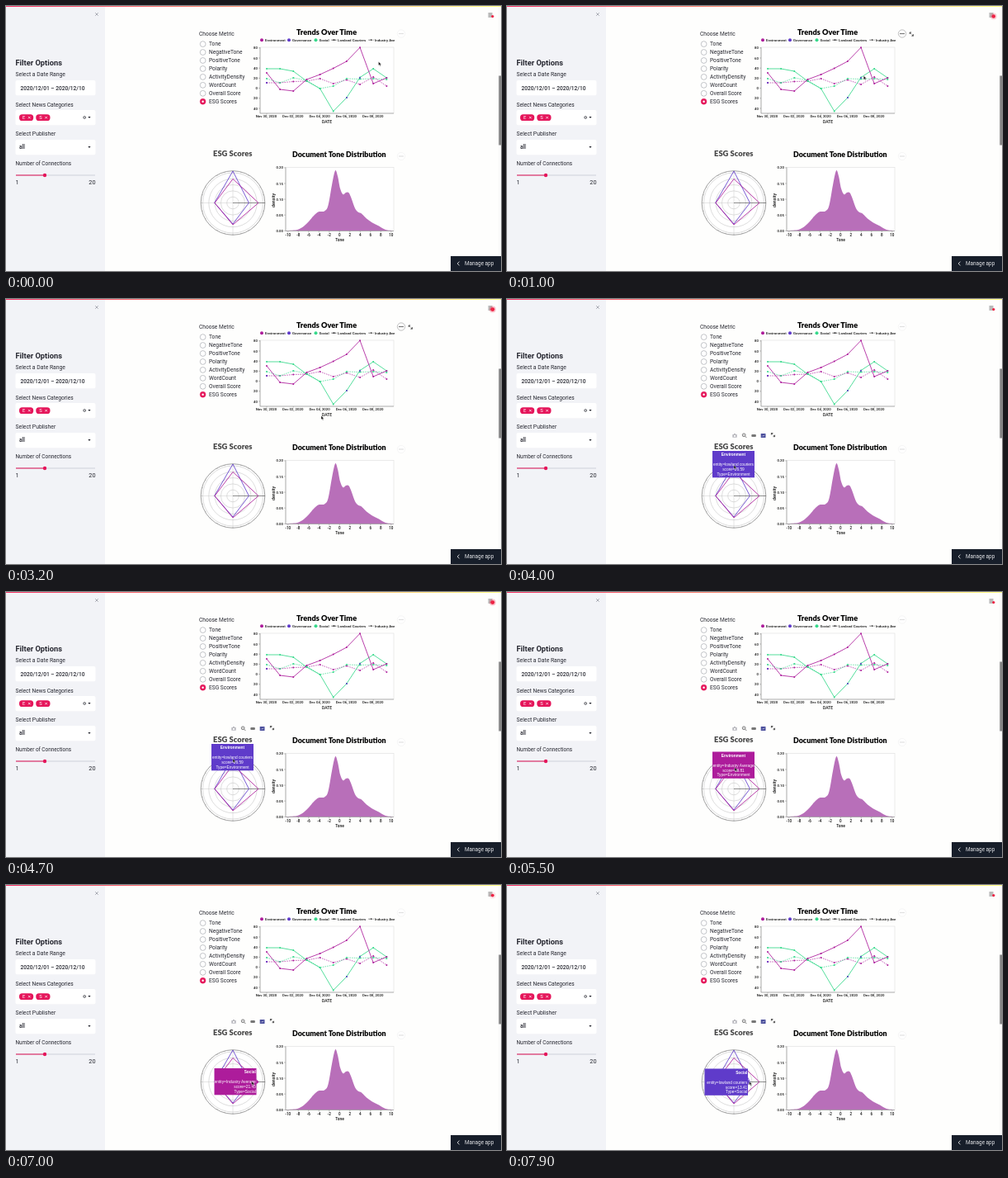
Write an HTML page that moves like this. It is 600 by 321 pixels and loops after 8000 ms.

```html
<!DOCTYPE html>
<html lang="en">
<head>
<meta charset="utf-8">
<title>News dashboard</title>
<style>
html, body { margin: 0; width: 100%; height: 100%; overflow: hidden; background: #fefefd; }
svg { display: block; width: 100%; height: 100%; }
text { font-family: Roboto, sans-serif; white-space: pre; }
.title { font-family: Lato, sans-serif; font-weight: 900; }
.chart text { fill: #111; font-weight: 500; }
.chart text.title { fill: #000; font-weight: 900; }
.chart text.soft { fill: #454545; }
.tip text { font-family: "Liberation Sans", Arial, sans-serif; }
</style>
</head>
<body>
<svg id="stage" viewBox="0 0 600 321" xmlns="http://www.w3.org/2000/svg"></svg>
<script>
const stage = document.getElementById('stage');
const INK = '#262730', PINK = '#e5165b', MAGENTA = '#ad1c9b', VIOLET = '#5f3bca', GREEN = '#36d98b';
const LOOP = 8000;

// Text placed by its vertical middle
const text = (x, y, size, str, extra = '') =>
  `<text x="${x}" y="${y + size * 0.36}" font-size="${size}" fill="${INK}" ${extra}>${str}</text>`;
const mid = 'text-anchor="middle"', end = 'text-anchor="end"', bold = 'font-weight="700"';
const rect = (x, y, w, h, fill, extra = '') =>
  `<rect x="${x}" y="${y}" width="${w}" height="${h}" fill="${fill}" ${extra}/>`;
const circle = (x, y, r, fill, extra = '') =>
  `<circle cx="${x}" cy="${y}" r="${r}" fill="${fill}" ${extra}/>`;
const path = (d, stroke, width = 1, extra = '') =>
  `<path d="${d}" fill="none" stroke="${stroke}" stroke-width="${width}" ${extra}/>`;
const cross = (x, y, r, color, width) =>
  path(`M${x - r} ${y - r}l${2 * r} ${2 * r}m0 ${-2 * r}l${-2 * r} ${2 * r}`, color, width);
const caret = (x, y) => `<path d="M${x - 1.6} ${y - 0.9}h3.2l-1.6 2z" fill="${INK}"/>`;
const range = (n, fn) => Array.from({ length: n }, (_, i) => fn(i)).join('');

function sidebar() {
  const tag = (x, letter) => rect(x, 131.2, 17.2, 7.9, PINK, 'rx="3.6"') +
    text(x + 4, 135.2, 5.8, letter, 'style="fill:#fff"') + cross(x + 12.3, 135.2, 1.3, '#fff', 0.7);
  return rect(0, 0, 120, 321, '#f2f3f7') +
    cross(110, 10, 1.8, '#8b8f98', 0.7) +
    text(11.5, 69, 9.3, 'Filter Options', bold) +
    text(11.5, 83, 6.8, 'Select a Date Range') +
    [90, 126, 162].map(y => rect(11.5, y, 97, 18.2, '#fff', 'rx="2"')).join('') +
    text(17.5, 99.3, 6.6, '2020/12/01 – 2020/12/10', 'font-weight="500"') +
    text(11.5, 119.4, 6.65, 'Select News Categories') +
    tag(16, 'E') + tag(36.3, 'S') +
    circle(95.2, 135, 1.5, 'none', `stroke="${INK}" stroke-width=".6"`) +
    cross(95.2, 135, 0.5, INK, 0.5) + caret(101, 135) +
    text(11.5, 154.5, 6.8, 'Select Publisher') +
    text(16, 171, 6.6, 'all', 'font-weight="500"') + caret(101, 171) +
    text(11.5, 190.5, 6.4, 'Number of Connections') +
    rect(12, 204.5, 96, 1, '#cfd2d9') + rect(12, 204.5, 35, 1, PINK) + circle(47, 205, 2.2, PINK) +
    text(11.5, 213.3, 7.3, '1') + text(108.5, 213.3, 7.3, '20', end);
}

function metrics() {
  const names = ['Tone', 'NegativeTone', 'PositiveTone', 'Polarity', 'ActivityDensity',
    'WordCount', 'Overall Score', 'ESG Scores'];
  return text(234, 33.8, 6.6, 'Choose Metric') + names.map((name, i) => {
    const y = 46.1 + i * 9.95, on = name === 'ESG Scores';
    return circle(238.6, y, 3.4, on ? PINK : '#fff', `stroke="${on ? PINK : '#888c94'}" stroke-width=".5"`) +
      (on ? circle(238.6, y, 1.2, '#fff') : '') + text(246, y, 6.6, name);
  }).join('');
}

function trends() {
  const x = i => 316 + i * 16.15;
  const series = (color, ys, dash) =>
    path('M' + ys.map((y, i) => `${x(i)} ${y}`).join('L'), color, dash ? 0.7 : 0.85, dash ? 'stroke-dasharray="1.5 1.2"' : '') +
    ys.map((y, i) => circle(x(i), y, 1, color)).join('');
  const key = (at, color, label) => circle(at, 41.2, 2, color) + text(at + 4, 41.3, 4.4, label);
  const dashKey = (at, label, dash) => path(`M${at} 41.2h6`, '#333', 0.8, dash) + circle(at + 3, 41.2, 0.9, '#333') +
    text(at + 7.5, 41.3, 4.4, label);
  return text(388.6, 32, 9.2, 'Trends Over Time', `class="title" ${mid}`) +
    key(310, MAGENTA, 'Environment') + key(343, VIOLET, 'Governance') + key(375.5, GREEN, 'Social') +
    dashKey(394.5, 'Lowland Couriers', '') + dashKey(439.5, 'Industry Ave', 'stroke-dasharray="1.5 1"') +
    rect(308, 50, 162, 80, '#fff', 'stroke="#dedede" stroke-width=".6"') +
    range(7, i => path(`M306 ${50.8 + i * 12.2}h2`, '#888', 0.5) +
      text(305, 50.8 + i * 12.2, 4.3, Math.abs(80 - i * 20), end)) +
    path('M308 50V130H470', '#888', 0.6) +
    ['Nov 30', 'Dec 02', 'Dec 04', 'Dec 06', 'Dec 08'].map((day, i) =>
      path(`M${x(i * 2)} 130v1.5`, '#888', 0.5) + text(x(i * 2) - 0.5, 133.5, 4.35, day + ', 2020', mid)).join('') +
    text(389, 140, 4.9, 'DATE', mid) +
    series(MAGENTA, [93, 93, 91.5, 91, 88, 94, 89.5, 95, 86, 97], true) +
    series(GREEN, [88, 93, 87, 90, 100, 97, 88, 88.5, 88, 89], true) +
    series(GREEN, [76, 76, 79, 91, 100, 127.5, 111, 86.5, 76, 87]) +
    series(MAGENTA, [81, 101, 103, 89, 83, 75.5, 67, 50.3, 94, 87]) +
    [[316, 93], [413, 111], [429, 87]].map(p => circle(...p, 1, VIOLET)).join('');
}

function radar() {
  const kite = (up, right, down, left, color) =>
    path(`M275 ${238.5 - up}L${275 + right} 238.5L275 ${238.5 + down}L${275 - left} 238.5z`, color, 0.85);
  const spokes = range(24, i => {
    const a = i * Math.PI / 12, c = Math.cos(a), s = Math.sin(a);
    return `M${275 + 37.5 * c} ${238.5 + 37.5 * s}L${275 + 39 * c} ${238.5 + 39 * s}`;
  });
  return text(274.7, 179, 9.4, 'ESG Scores', `class="title soft" ${mid}`) +
    circle(275, 238.5, 38.8, '#fff', 'stroke="#777" stroke-width=".7"') +
    [7.3, 14.6, 21.9, 29.2, 36.5].map(r => circle(275, 238.5, r, 'none', 'stroke="#b4b4b4" stroke-width=".45"')).join('') +
    path('M236 238.5H314M275 199.5V277.5', '#c4c4c4', 0.45) + path(spokes, '#888', 0.4) +
    path('M275 238.5H314', '#555', 0.6) +
    kite(38.5, 19.4, 25.5, 22.3, VIOLET) + kite(29, 31, 26.5, 22, MAGENTA);
}

// Smooth curve through a few points
function smooth(p) {
  let d = `M${p[0]}`;
  for (let i = 0; i < p.length - 1; i++) {
    const a = p[i - 1] || p[i], b = p[i], c = p[i + 1], e = p[i + 2] || c;
    d += `C${b[0] + (c[0] - a[0]) / 6} ${b[1] + (c[1] - a[1]) / 6} ${c[0] - (e[0] - b[0]) / 6} ${c[1] - (e[1] - b[1]) / 6} ${c}`;
  }
  return d;
}

function density() {
  const curve = smooth([[339, 272], [347, 271.7], [354, 270.8], [361, 266.8], [367, 261], [373, 254], [379, 249.2],
    [386, 248.5], [390.5, 241.5], [395, 217], [399, 199.5], [402, 206], [405, 221], [408.5, 228.3], [412, 226],
    [415.5, 226.3], [419, 234], [423, 245], [427, 249.8], [431, 251.5], [437, 257.5], [444, 262.5], [452, 266.5], [460, 271], [469, 272]]);
  return text(403.8, 180, 8.9, 'Document Tone Distribution', `class="title" ${mid}`) +
    rect(339, 195.5, 131, 77, '#fff', 'stroke="#dedede" stroke-width=".6"') +
    `<path d="${curve}V272.3H339z" fill="#b86fb9"/>` +
    path('M339 195.5V272.5H470', '#888', 0.6) +
    range(5, i => path(`M337 ${272.3 - i * 19.1}h2`, '#888', 0.5) +
      text(336, 272.3 - i * 19.1, 4.3, (i * 0.05).toFixed(2), end)) +
    range(11, i => path(`M${341.8 + i * 12.5} 272.5v2`, '#888', 0.5) +
      text(341.8 + i * 12.5, 277.5, 4.6, i * 2 - 10, mid)) +
    text(404.5, 283.1, 4.9, 'Tone', mid) +
    text(0, 0, 5.3, 'density', `${mid} transform="translate(324 235.5) rotate(-90)"`);
}

const dots = (x, y, color) => [-2, 0, 2].map(dx => circle(x + dx, y, 0.7, color)).join('');
const menuButton = (y, ring, color) =>
  circle(479, y, 4.6, '#fff', `stroke="${ring}" stroke-width=".6"`) + dots(479, y, color);
const expand = (x, y) =>
  path(`M${x - 2} ${y}v-2h2M${x - 2} ${y - 2}l1.7 1.7M${x + 2.2} ${y + 0.2}v2h-2M${x + 2.2} ${y + 2.2}l-1.7 -1.7`, '#333', 0.8);

function chartTools() {
  return rect(273.3, 164, 5.4, 3.8, '#b8b8be', 'rx=".6"') + rect(275, 163, 2, 1.4, '#b8b8be') + circle(276, 165.9, 1.1, '#fff') +
    circle(287.2, 164.8, 1.9, '#ddd', 'stroke="#777" stroke-width=".9"') + path('M288.6 166.2l1.8 1.8', '#777', 1) +
    rect(296.3, 163.9, 5.6, 3, '#777', 'rx="1"') +
    rect(307.7, 162.9, 5.8, 5, '#4b4f9c', 'rx=".5"') + path('M309 166.5l1-1 1 .6 1.2-1.5', '#fff', 0.5) +
    expand(322.4, 164.5);
}

function chrome() {
  return rect(596.5, 0, 3.5, 321, '#fafafa') + rect(597.3, 84.5, 2.7, 84, '#858585') +
    rect(0, 0, 600, 1, 'url(#glow)') +
    path('M584.5 9h5M584.5 11h5M584.5 13h5', '#555', 0.8) +
    circle(589.8, 12.6, 4, '#ee2244', 'id="halo"') + circle(589.8, 12.6, 1.6, '#ee2244', 'id="dot"') +
    rect(539, 303, 61, 18, '#171e2a') + path('M549.5 309.6l-2.3 2.4 2.3 2.4', '#fff', 0.8) +
    text(556, 312, 6.4, 'Manage app', 'style="fill:#e6e7ea"');
}

// Hover labels: [start, end, x, y, anchor, color, heading, entity, score]
const tips = [
  [3700, 4900, 249, 184, 'middle', VIOLET, 'Environment', 'lowland couriers', '26.59'],
  [4900, 5900, 249, 193.5, 'middle', MAGENTA, 'Environment', 'Industry Average', '19.81'],
  [6100, 7100, 252.5, 222, 'end', MAGENTA, 'Social', 'Industry Average', '21.45'],
  [7100, 8000, 239.5, 222.5, 'end', VIOLET, 'Social', 'lowland couriers', '13.41']
];

function tooltip([, , x, y, anchor, color, heading, entity, score], i) {
  const w = anchor === 'end' && color === VIOLET ? 52.5 : 51;
  const tx = anchor === 'end' ? x + w - 0.7 : x + w / 2;
  const line = (dy, str, extra = '') => text(tx, y + dy, 4.8, str, `text-anchor="${anchor}" ${extra} style="fill:#fff"`);
  const tipPoint = anchor === 'end' ? `<path d="M${x + w} 236l3 2.5-3 2.5z" fill="${color}"/>` : '';
  return `<g class="tip" id="tip${i}">` + rect(x, y, w, 32.3, color) + tipPoint +
    line(4.7, heading, bold) + line(16.4, 'entity=' + entity) + line(22.4, 'score=' + score) +
    line(28.2, 'Type=' + heading) + '</g>';
}

stage.innerHTML = `<defs><linearGradient id="glow"><stop stop-color="#f63366"/><stop offset="1" stop-color="#fffd80"/></linearGradient></defs>` +
  rect(0, 0, 600, 321, '#fefefd') + sidebar() + metrics() +
  `<g class="chart">${trends()}${radar()}${density()}</g>` +
  menuButton(33.5, '#eee', '#ccc') + menuButton(182, '#eee', '#ccc') + chrome() +
  `<g id="trendTools">${menuButton(33.5, '#999', '#222')}${expand(490.2, 34)}</g>` +
  `<g id="radarTools">${chartTools()}</g>` + tips.map(tooltip).join('') +
  `<path id="pointer" d="M0 0v4.6l1.1-1 .8 1.7.9-.4-.8-1.6h1.5z" fill="#111" stroke="#fff" stroke-width=".35"/>`;

const part = id => document.getElementById(id);
const show = (id, on) => part(id).setAttribute('visibility', on ? 'visible' : 'hidden');

// Pointer stops: [time, x, y]
const stops = [[0, 451.5, 67.5], [300, 451.5, 67.5], [1200, 429.5, 87], [2200, 429.5, 87], [2700, 388, 134],
  [3200, 382, 141.5], [3650, 275, 201], [4700, 275, 202], [5000, 276, 212.5], [5600, 276, 212.5],
  [6200, 302, 237.5], [6800, 302, 237.5], [7200, 293.5, 238], [8000, 293.5, 238]];

function pointerAt(t) {
  const i = Math.max(1, stops.findIndex(s => s[0] > t));
  const [t0, x0, y0] = stops[i - 1], [t1, x1, y1] = stops[i];
  const u = (t - t0) / (t1 - t0), e = u * u * (3 - 2 * u);
  return [x0 + (x1 - x0) * e, y0 + (y1 - y0) * e];
}

function draw(t) {
  const [x, y] = pointerAt(t);
  part('pointer').setAttribute('transform', `translate(${x.toFixed(2)} ${y.toFixed(2)})`);
  const pulse = Math.max(0, Math.cos((t - 3050) / 1800 * 2 * Math.PI));
  part('halo').setAttribute('opacity', 0.3 * pulse);
  part('dot').setAttribute('r', 1.6 + pulse);
  show('trendTools', t >= 200 && t < 3400);
  show('radarTools', t >= 3500);
  tips.forEach(([from, to], i) => show('tip' + i, t >= from && t < to));
}

const start = performance.now();
function tick() {
  draw((performance.now() - start) % LOOP);
  requestAnimationFrame(tick);
}
tick();
</script>
</body>
</html>
```
